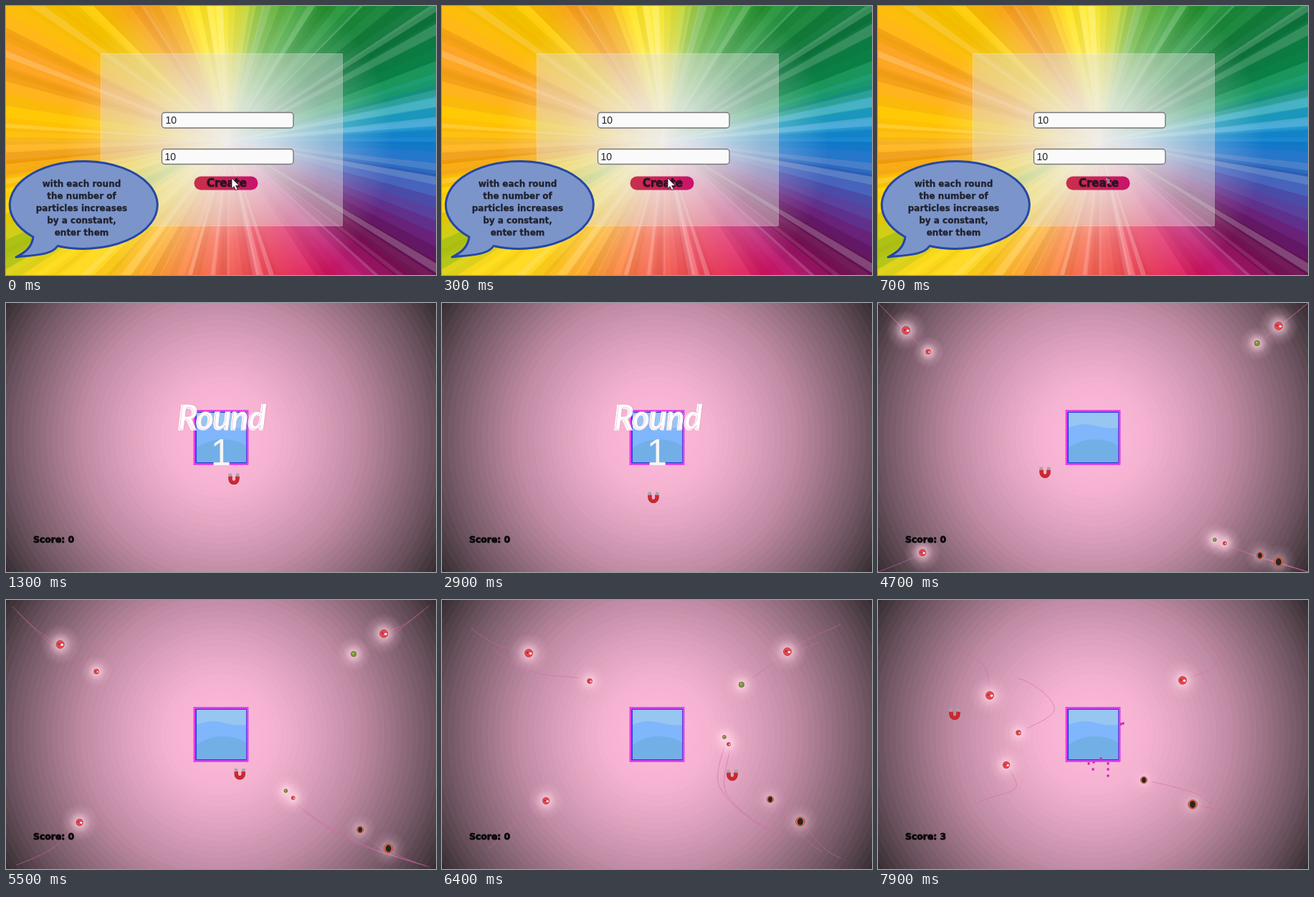
These frames come from a looping animation (600x375 px, 8000 ms). An HTML page:

```html
<!DOCTYPE html>
<html lang="en">
<head>
<meta charset="utf-8">
<title>Particle game</title>
<style>
html, body { margin: 0; width: 100%; height: 100%; overflow: hidden; background: #352d31; }
svg { display: block; width: 100%; height: 100%; }
.chunky { font-family: "DejaVu Sans", sans-serif; font-weight: 700; paint-order: stroke; stroke-linejoin: round; }
.plain { font-family: "Liberation Sans", Arial, sans-serif; }
.script { font-family: Lato, sans-serif; font-weight: 700; font-style: italic; font-size: 47px; letter-spacing: -1px; }
</style>
</head>
<body>
<svg viewBox="0 0 600 375" xmlns="http://www.w3.org/2000/svg">
  <defs>
    <radialGradient id="flash">
      <stop offset="0" stop-color="#fff" stop-opacity=".95"/>
      <stop offset=".25" stop-color="#fff" stop-opacity=".72"/>
      <stop offset=".6" stop-color="#fff" stop-opacity=".27"/>
      <stop offset="1" stop-color="#fff" stop-opacity="0"/>
    </radialGradient>
    <radialGradient id="glow">
      <stop offset="0" stop-color="#ffdfe9" stop-opacity=".95"/>
      <stop offset=".3" stop-color="#ffd2e2" stop-opacity=".55"/>
      <stop offset=".6" stop-color="#ffc8dd" stop-opacity=".2"/>
      <stop offset="1" stop-color="#ffc0da" stop-opacity="0"/>
    </radialGradient>
    <linearGradient id="pill">
      <stop offset="0" stop-color="#c9304a"/>
      <stop offset="1" stop-color="#c9136c"/>
    </linearGradient>
    <clipPath id="inner"><rect x="266" y="153" width="69" height="69"/></clipPath>
  </defs>

  <g id="menu">
    <g id="rays"></g>
    <circle cx="310" cy="188" r="230" fill="url(#flash)"/>
    <rect x="132.5" y="66.5" width="337" height="240" fill="#dededa" fill-opacity=".42" stroke="#fff" stroke-opacity=".25"/>
    <g fill="#fafafa" stroke="#777" stroke-width="1.4">
      <rect x="217.5" y="148.5" width="183.5" height="21.5" rx="4"/>
      <rect x="217.5" y="199.5" width="183.5" height="21" rx="4"/>
    </g>
    <g class="plain" font-size="14" fill="#222">
      <text x="222.5" y="164">10</text>
      <text x="221.5" y="214.5">10</text>
    </g>
    <rect x="262.5" y="237.5" width="89" height="19" rx="9.5" fill="url(#pill)"/>
    <text class="chunky" x="308" y="252" font-size="15" text-anchor="middle" fill="#2b1420" stroke="#2b1420" stroke-width=".8">Create</text>
    <path d="M38 322 A103 61 0 1 1 72 334.5 C64 347 42 347 14 350 C28 343 36 336 38 322 Z"
      fill="#7b95cb" stroke="#2547a5" stroke-width="3" stroke-linejoin="round"/>
    <g id="hint" class="chunky" font-size="12" text-anchor="middle" fill="#20212c" stroke="#20212c" stroke-width=".3"></g>
    <path id="arrow" d="M315 240 v14.5 l3.2 -3 2.4 5.2 2.5 -1.2 -2.4 -5 4.4 -.3 Z" fill="#fff" stroke="#222" stroke-width=".8"/>
    <path id="spot" d="M318 240 l5 1 1 6 -4 1 Z" fill="#f0d5dc" opacity=".55"/>
  </g>

  <g id="game">
    <g id="vignette"></g>
    <g id="trails" fill="none" stroke="#d965a6" stroke-width=".8" opacity=".75"></g>
    <g id="glows"></g>
    <rect x="263" y="150.5" width="74" height="74" fill="#2b43d8" stroke="#ee3bee" stroke-width="2.4"/>
    <rect x="262" y="149.5" width="76" height="76" fill="none" stroke="#c22fd0" stroke-width=".8" stroke-dasharray="1.5 1.5"/>
    <g clip-path="url(#inner)">
      <rect x="266" y="153" width="69" height="69" fill="#97c6f2"/>
      <path d="M266 174 Q285 166 303 171 T335 174 V222 H266 Z" fill="#80b6fc"/>
      <path d="M266 202 Q282 190 302 190 T335 199 V222 H266 Z" fill="#73afe7"/>
    </g>
    <g id="bits"></g>
    <g id="balls"></g>
    <g id="round" fill="#fff">
      <text class="script" x="239" y="177" stroke="#fff" stroke-width="1">Round</text>
      <text class="script" x="240.5" y="176" fill="none" stroke="#dda3bd" stroke-width=".5">Round</text>
      <text class="plain" x="300" y="226" font-size="51" text-anchor="middle" fill="#f6f6f6">1</text>
    </g>
    <text id="score" class="chunky" x="38" y="333.5" font-size="12.4" fill="#080608" stroke="#080608" stroke-width=".8"></text>
    <g id="magnet" fill="none" stroke-width="4.4">
      <path d="M-5 -3.5 V0.5 A5 5 0 0 0 5 0.5 V-3.5" stroke="#7e1c22" stroke-width="5.2"/>
      <path d="M-5 -3.5 V0.5 A5 5 0 0 0 5 0.5 V-3.5" stroke="#d3262c"/>
      <path d="M-5 -3.2 L-5.6 -7.4 M5 -3.2 L5.6 -7.4" stroke="#aaa3a6"/>
    </g>
  </g>
</svg>
<script>
const LOOP = 8000, GAME_AT = 1100, ROUND_END = 3400, SPAWN = 3500;
const $ = id => document.getElementById(id);

function add(parent, tag, attrs) {
  const el = document.createElementNS("http://www.w3.org/2000/svg", tag);
  for (const k in attrs) el.setAttribute(k, attrs[k]);
  return parent.appendChild(el);
}
const show = (el, on) => el.setAttribute("display", on ? "inline" : "none");

let seed = 11;
const rand = () => (seed = (seed * 16807) % 2147483647) / 2147483647;

// Colour ramp: "position:hex" entries, interpolated linearly
function ramp(spec) {
  const stops = spec.split(" ").map(s => {
    const [p, hex] = s.split(":");
    return [+p, [0, 2, 4].map(i => parseInt(hex.slice(i, i + 2), 16))];
  });
  return (x, shift = 0) => {
    let i = 0;
    while (i < stops.length - 2 && x > stops[i + 1][0]) i++;
    const [p, a] = stops[i], [q, b] = stops[i + 1];
    const u = Math.min(1, Math.max(0, (x - p) / (q - p)));
    return `rgb(${a.map((v, k) => Math.round(Math.min(255, Math.max(0, v + (b[k] - v) * u + shift))))})`;
  };
}

const rainbow = ramp("0:1a86d6 12:3b62bb 20:5a3f9c 26:6a2078 33:641650 40:9a1a68 48:c0186a 58:da1f5c 70:e62a48 " +
  "82:ea3a3c 96:f0503a 110:f47a30 122:f8a428 134:ffd023 146:f4d415 153:a5c41c 160:e8d010 168:ffce00 174:f8a01a " +
  "187:ffc800 195:f6a51a 203:f39a1c 211:fdbc0c 222:ffce08 236:f39a1c 246:f8ac16 254:ffdc08 268:f0dc08 " +
  "276:c8d01c 286:6ab433 300:3c9f3a 315:1f8a3c 328:0c7038 342:159358 350:1f9fb8 360:1a86d6");

function wedge(from, to, fill, opacity = 1) {
  const pt = deg => {
    const a = deg * Math.PI / 180;
    return `${(310 + 480 * Math.cos(a)).toFixed(1)} ${(188 + 480 * Math.sin(a)).toFixed(1)}`;
  };
  add($("rays"), "path", { d: `M310 188 L${pt(from)} L${pt(to)} Z`, fill, opacity });
}
for (let a = 0; a < 360; a += 3) wedge(a, a + 3.3, rainbow(a + 1.5, (rand() - .5) * 20));
for (let i = 0; i < 64; i++) {
  const a = rand() * 360, w = .7 + rand() * 2.6;
  wedge(a, a + w, i % 2 ? "#fff" : rainbow(a, -35), .08 + rand() * .14);
}

["with each round", "the number of", "particles increases", "by a constant,", "enter them"].forEach((s, i) => {
  add($("hint"), "text", { x: 105.5, y: 252 + i * 17 }).textContent = s;
});

const shade = ramp("0:fdbadb 75:f5b2d1 130:dfa2be 190:c18ca5 240:9c7386 300:6b525e 354:352d31");
for (let r = 364; r > 0; r -= 8) add($("vignette"), "circle", { cx: 300, cy: 187.5, r, fill: shade(r - 4) });

// Catmull-Rom through flat x,y pairs placed at the given times
function along(pts, times, t) {
  const n = times.length;
  t = Math.min(times[n - 1], Math.max(times[0], t));
  let i = 0;
  while (i < n - 2 && t > times[i + 1]) i++;
  const u = (t - times[i]) / (times[i + 1] - times[i]);
  const at = (k, c) => pts[2 * Math.min(n - 1, Math.max(0, k)) + c];
  return [0, 1].map(c => {
    const a = at(i - 1, c), b = at(i, c), d = at(i + 1, c), e = at(i + 2, c);
    return b + .5 * u * (d - a + u * (2 * a - 5 * b + 4 * d - e + u * (3 * (b - d) + e - a)));
  });
}

const TIMES = [SPAWN, 4700, 5550, 6400, 7150, 7900];
const BALLS = [
  { kind: "red", r: 5.6, glow: 28, path: [0,0, 39,38, 78,63, 121,74, 150,95, 156,133] },
  { kind: "red", r: 3.5, glow: 22, path: [0,0, 70,68, 130,101, 206,113, 246,153, 196,185] },
  { kind: "red", r: 5.6, glow: 28, path: [600,0, 559,32, 525,48, 482,72, 466,95, 425,112] },
  { kind: "green", r: 3.8, glow: 24, path: [600,0, 529,56, 482,77, 418,118, 367,152, 320,182], end: 7600 },
  { kind: "red", r: 4.8, glow: 26, path: [0,375, 62,348, 105,308, 145,280, 192,262, 179,230] },
  { kind: "green", r: 2.5, glow: 23, path: [600,375, 470,330, 388,262, 394,191, 335,240, 270,205], end: 7450 },
  { kind: "red", r: 2.6, glow: 23, path: [600,375, 484,335, 398,272, 400,201, 345,250, 300,205], end: 7550 },
  { kind: "dark", r: 4.7, glow: 22, path: [600,375, 533,352, 492,318, 458,278, 422,263, 371,251] },
  { kind: "dark", r: 6.4, glow: 25, path: [600,375, 559,361, 532,345, 500,309, 478,294, 439,285] }
];
const LOOK = {
  red: ["#e8454e", "#fff", .45, .1],
  green: ["#6f9a3c", "#e2c04a", -.2, -.2],
  dark: ["#dc6a35", "#262428", 0, 0]
};

for (const b of BALLS) {
  const [body, mark, dx, dy] = LOOK[b.kind], r = b.r, dark = b.kind === "dark";
  b.trail = add($("trails"), "polyline", {});
  b.halo = add($("glows"), "circle", { r: b.glow, fill: "url(#glow)", opacity: dark ? .6 : 1 });
  b.el = add($("balls"), "g", {});
  add(b.el, "circle", { r, fill: body, stroke: "#7a3038", "stroke-width": .5 });
  add(b.el, "ellipse", { cx: dx * r, cy: dy * r, fill: mark, rx: r * (dark ? .62 : .34), ry: r * (dark ? .78 : .26) });
  if (b.kind === "red") add(b.el, "circle", { cx: -.35 * r, cy: -.1 * r, r: .16 * r, fill: "#5a1a20" });
}

// Small fragments that fall away after a hit: x, rest y, hit time
const BITS = [
  [294, 228, 7450], [300, 236, 7450], [301, 226, 7450],
  [311, 221, 7550], [321, 228, 7550], [321, 236, 7550], [321, 245, 7550],
  [339, 173, 7600], [342, 172, 7600]
].map(([x, y, at]) => {
  const el = add($("bits"), "g", {});
  add(el, "circle", { r: 1.9, fill: "#e23bc8" });
  add(el, "circle", { r: .8, fill: "#8a1a70" });
  return { x, y, at, el };
});

const MAG_TIMES = [1300, 2900, 4700, 6400, 7900];
const MAG_PATH = [318,245, 295,271, 233,236, 405,244, 107,159];

function drawBall(b, t) {
  const alive = t >= SPAWN && !(t >= b.end);
  [b.trail, b.halo, b.el].forEach(el => show(el, alive));
  if (!alive) return;
  const [x, y] = along(b.path, TIMES, t), pts = [];
  b.el.setAttribute("transform", `translate(${x} ${y})`);
  b.halo.setAttribute("cx", x);
  b.halo.setAttribute("cy", y);
  for (let s = Math.max(SPAWN, t - 1650); s <= t - 200; s += 50) {
    pts.push(along(b.path, TIMES, s).map(v => v.toFixed(1)).join());
  }
  b.trail.setAttribute("points", pts.join(" "));
}

function draw(t) {
  const inGame = t >= GAME_AT;
  show($("menu"), !inGame);
  show($("game"), inGame);
  show($("arrow"), t < 600);
  show($("spot"), t >= 600);
  show($("round"), t < ROUND_END);
  BALLS.forEach(b => drawBall(b, t));
  for (const p of BITS) {
    const u = Math.min(1, (t - p.at) / 300);
    show(p.el, u >= 0);
    p.el.setAttribute("transform", `translate(${p.x} ${p.y - 10 * (1 - u) * (1 - u)})`);
  }
  $("score").textContent = "Score: " + BALLS.filter(b => t >= b.end).length;
  const [mx, my] = along(MAG_PATH, MAG_TIMES, t);
  $("magnet").setAttribute("transform", `translate(${mx} ${my})`);
}

function tick() {
  draw(performance.now() % LOOP);
  requestAnimationFrame(tick);
}
tick();
</script>
</body>
</html>
```
